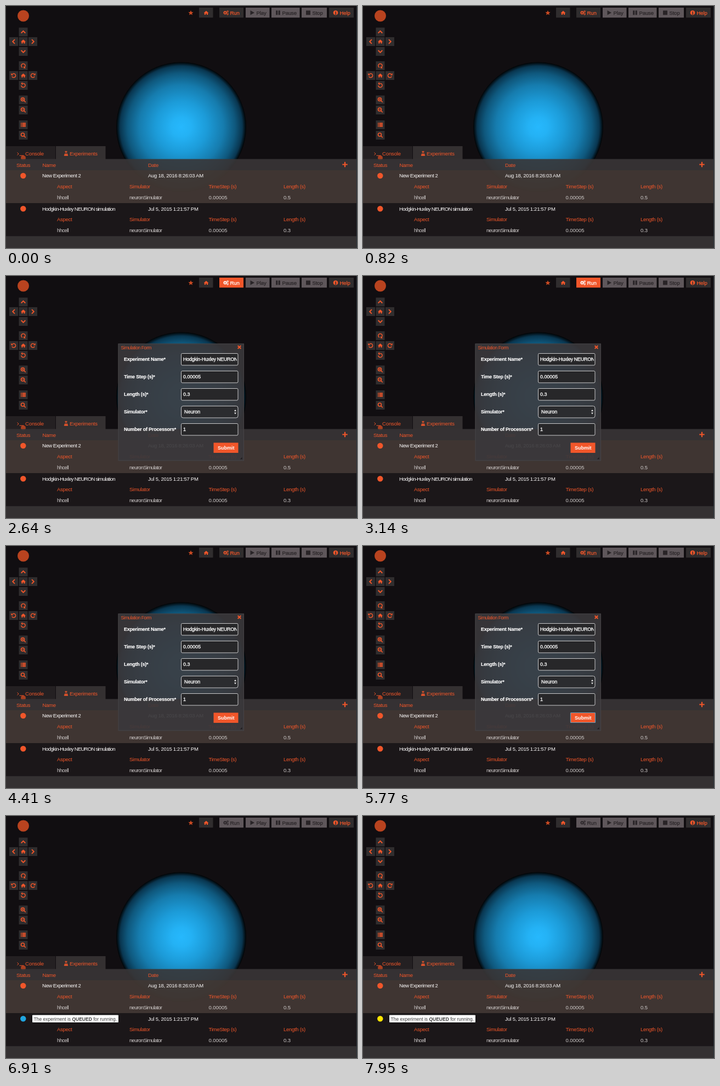
These frames come from a looping animation (640x442 px, 8 s). An HTML page:

```html
<!DOCTYPE html>
<html lang="en">
<head>
<meta charset="utf-8">
<title>Simulation experiments</title>
<style>
  html, body { margin: 0; width: 100%; height: 100%; overflow: hidden; background: #110e11; }
  svg { display: block; width: 100vw; height: 100vh; }
  text { font-family: "Liberation Sans", Arial, sans-serif; white-space: pre; }
</style>
</head>
<body>
<svg id="stage" viewBox="0 0 640 442"></svg>
<script>
const ORANGE = '#f1562a', WHITE = '#fbf9f9', BUTTON = '#302d2e', DISABLED = '#5f575b', INK = '#292427';
const LOOP = 8000;
const RUN_HOVER = 2050, FORM_OPEN = 2450, RUN_LEAVE = 3750;
const SUBMIT_FOCUS = 5350, FORM_CLOSE = 5900, QUEUED = 6300, WAITING = 7400;

const rect = (x, y, w, h, fill, extra = '') =>
  `<rect x="${x}" y="${y}" width="${w}" height="${h}" fill="${fill}" ${extra}/>`;
const circle = (x, y, r, fill, extra = '') =>
  `<circle cx="${x}" cy="${y}" r="${r}" fill="${fill}" ${extra}/>`;
// `thick` outlines the glyphs slightly, for a weight between regular and bold.
const label = (x, y, str, { size = 9.5, fill = ORANGE, gap = -.28, weight = 400, thick = 0 } = {}) =>
  `<text x="${x}" y="${y + 3.4}" font-size="${size}" fill="${fill}" stroke="${fill}" stroke-width="${thick}"
    letter-spacing="${gap}" font-weight="${weight}">${str}</text>`;
const group = (id, content) => `<g id="${id}">${content}</g>`;

// Icons are drawn around 0,0 and take their colour from the enclosing group.
const line = (d, width = 1.5) => `<path d="${d}" fill="none" stroke="currentColor" stroke-width="${width}"/>`;
const solid = d => `<path d="${d}" fill="currentColor"/>`;
const spin = (art, transform) => `<g transform="${transform}">${art}</g>`;
const turn = line('M-3.3 1.5A3.6 3.6 0 1 0-2.4-2.7') + solid('M-4.7-4.6V-.6H-.7Z');
const lens = line('M2-1A3 3 0 1 0-4-1A3 3 0 1 0 2-1M1.3 1.3L4.3 4.3', 1.6);
const chevron = angle => spin(line('M-3.8 2L0-1.8L3.8 2', 1.9), `rotate(${angle})`);
const gear = (x, y, r) =>
  circle(x, y, r, 'none', `stroke="currentColor" stroke-width="${r * .7}"`) +
  circle(x, y, r * 1.5, 'none', `stroke="currentColor" stroke-width="1" stroke-dasharray="${r * .6}"`);
const ICONS = {
  home: solid('M0-3.7L4.5 .3H3.2V3.6H.9V1.2H-.9V3.6H-3.2V.3H-4.5Z'),
  up: chevron(0), right: chevron(90), down: chevron(180), left: chevron(270),
  undo: turn,
  redo: spin(turn, 'scale(-1 1)'),
  over: spin(turn, 'rotate(90) scale(-1 1)'),
  under: spin(turn, 'rotate(25)'),
  search: lens,
  zoomIn: lens + line('M-2.7-1H.7M-1-2.7V.7', 1),
  zoomOut: lens + line('M-2.7-1H.7', 1),
  list: line('M-4.5-3H-3M-2-3H4.5M-4.5-1H-3M-2-1H4.5M-4.5 1H-3M-2 1H4.5M-4.5 3H-3M-2 3H4.5', 1.3),
  star: solid('M0-4.6L1.3-1.5L4.6-1.3L2.1.8L2.9 4L0 2.3L-2.9 4L-2.1.8L-4.6-1.3L-1.3-1.5Z'),
  gears: gear(-1.5, 0, 2) + gear(3.1, -2.4, 1.1) + gear(3.1, 2.4, 1.1),
  play: solid('M-3.5-4.3L4 0L-3.5 4.3Z'),
  pause: solid('M-3.8-4H-.7V4H-3.8ZM.7-4H3.8V4H.7Z'),
  stop: solid('M-4-4H4V4H-4Z'),
  info: circle(0, 0, 4.3, 'currentColor') +
    `<path d="M-1-.6H.4V2.5M-1.2 2.5H1.4M-.3-2.5H.8" fill="none" stroke="${BUTTON}" stroke-width="1.2"/>`,
  flask: line('M-2-4H2M-1-4V-1L-3.4 3.5H3.4L1-1V-4', 1) + solid('M-2 1H2L3.4 3.7H-3.4Z'),
  prompt: line('M-5.5-2.5L-3 0L-5.5 2.5M-1.5 3.2H6.5', 1),
  plus: line('M-4.7 0H4.7M0-4.7V4.7', 2.2),
  close: line('M-2.8-2.8L2.8 2.8M2.8-2.8L-2.8 2.8', 2),
};
const icon = (name, x, y, color = ORANGE) =>
  `<g transform="translate(${x} ${y})" color="${color}">${ICONS[name]}</g>`;

const toolButton = (name, x, y) => rect(x - 8, y - 8, 16, 16, BUTTON) + icon(name, x, y);
const barButton = (x, w, name, str, fill, ink) =>
  rect(x, 3, w, 18.2, fill) + icon(name, x + 12, 12.3, ink) +
  label(x + 19.5, 12.5, str, { fill: ink, gap: -.1, thick: .25 });

function scene() {
  return `<defs><radialGradient id="ball">
      <stop offset="0" stop-color="#26b8fd"/><stop offset=".15" stop-color="#24b2f5"/>
      <stop offset=".4" stop-color="#1c9bd8"/><stop offset=".65" stop-color="#167cae"/>
      <stop offset=".83" stop-color="#0f587d"/><stop offset=".94" stop-color="#093650"/>
      <stop offset=".975" stop-color="#041722"/><stop offset="1" stop-color="#020304"/>
    </radialGradient>
    <clipPath id="nameField">${rect(320, 142, 101, 21, '#000')}</clipPath></defs>` +
    rect(0, 0, 640, 442, '#110e11') + circle(319.5, 221, 118.5, 'url(#ball)');
}

function toolbars() {
  const tools = [
    ['up', 31.5, 47.5], ['left', 14, 65], ['home', 31.5, 65], ['right', 49, 65], ['down', 31.5, 83],
    ['over', 31.5, 109], ['undo', 14, 127], ['home', 31.5, 127], ['redo', 49, 127], ['under', 31.5, 145],
    ['zoomIn', 31.5, 171.5], ['zoomOut', 31.5, 190], ['list', 31.5, 217], ['search', 31.5, 236],
  ];
  return circle(31.5, 18, 10.5, '#b8431f') + tools.map(t => toolButton(...t)).join('') +
    icon('star', 337, 12.5, '#c94a23') + rect(352, 3, 25.5, 18.2, BUTTON) + icon('home', 365, 12.5) +
    group('runIdle', barButton(389, 44, 'gears', 'Run', BUTTON, ORANGE)) +
    group('runHover', barButton(389, 44, 'gears', 'Run', ORANGE, '#fff')) +
    group('runOff', barButton(389, 44, 'gears', 'Run', DISABLED, INK)) +
    barButton(437, 43.5, 'play', 'Play', DISABLED, INK) +
    barButton(484, 51.5, 'pause', 'Pause', DISABLED, INK) +
    barButton(539, 46, 'stop', 'Stop', DISABLED, INK) +
    barButton(589, 45, 'info', 'Help', BUTTON, ORANGE);
}

function experiment(y, id, name, nameGap, date, length) {
  const columns = [[93, 'Aspect', 'hhcell', -.65], [225, 'Simulator', 'neuronSimulator', -.7],
    [369.5, 'TimeStep (s)', '0.00005', -.05], [506, 'Length (s)', length, -.05]];
  return circle(31.3, y + 10, 5.2, ORANGE, `id="${id}"`) +
    label(66, y + 10, name, { fill: WHITE, gap: nameGap }) + label(259, y + 10, date, { fill: WHITE }) +
    columns.map(([x, head, value, gap]) => label(x, y + 29.5, head) +
      label(x, y + 49.3, value, { fill: '#d0cccb', gap })).join('');
}

function panel() {
  return rect(0, 256, 90, 24, '#242022') + rect(91, 256, 90.5, 24, '#343031') +
    circle(31.5, 277.5, 4.5, '#a83f20') + icon('prompt', 26, 270) + label(35, 270, 'Console', { gap: -.12 }) +
    icon('flask', 109.5, 269.5) + label(116, 269.5, 'Experiments', { gap: -.18 }) +
    rect(0, 279.5, 640, 21, '#393637', 'opacity=".9"') +
    rect(0, 300, 640, 60.3, '#413733', 'opacity=".97"') +
    rect(0, 360.3, 640, 60, '#1b1719') + rect(0, 420.3, 640, 22, '#343132') +
    label(19, 290.5, 'Status') + label(66.5, 290.5, 'Name') + label(259, 290.5, 'Date') + icon('plus', 618, 289.5) +
    experiment(300, 'firstDot', 'New Experiment 2', -.45, 'Aug 18, 2016 8:26:03 AM', '0.5') +
    experiment(360.3, 'secondDot', 'Hodgkin-Huxley NEURON simulation', -.73, 'Jul 5, 2015 1:21:57 PM', '0.3') +
    rect(639, 0, 1, 442, '#28323a');
}

function form() {
  const fields = [['Experiment Name*', 'Hodgkin-Huxley NEURON simulation'], ['Time Step (s)*', '0.00005'],
    ['Length (s)*', '0.3'], ['Simulator*', 'Neuron'], ['Number of Processors*', '1']];
  const rows = fields.map(([title, value], i) => {
    const y = 152.3 + i * 32, select = i === 3;
    return label(215, y - .3, title, { size: 9, fill: '#fff', gap: -.24, weight: 700, thick: .15 }) +
      rect(319.5, y - 10.8, 103.5, 21.5, select ? '#2b2c2f' : '#272729', `rx="${select ? 3.5 : 2}" stroke="#c9c9ca"`) +
      `<g ${i ? '' : 'clip-path="url(#nameField)"'}>` +
      label(select ? 325 : 323, y - .5, value, { size: 9, fill: '#fff', gap: i ? -.05 : -.28, thick: .3 }) + '</g>';
  }).join('');
  return rect(204.5, 123.5, 229.5, 214, '#3a383b', 'opacity=".92"') +
    rect(205, 124, 228.5, 213, 'none', 'stroke="#474446"') +
    label(209.5, 130.5, 'Simulation Form', { size: 8.5, gap: -.43 }) + icon('close', 425.5, 130) + rows +
    '<path d="M416 247L418 244L420 247ZM416 249.5L418 252.5L420 249.5Z" fill="#eee"/>' +
    '<path d="M427 334.5H430.5V331Z" fill="#1c1a1c"/>' +
    rect(378.5, 304.5, 45, 18.5, ORANGE) +
    group('focusRing', rect(378.5, 304.5, 45, 18, 'none', 'rx="1" stroke="#5f9dbd" stroke-width="1.2"')) +
    label(386, 313.8, 'Submit', { size: 9, fill: '#fff', gap: 0, weight: 700 });
}

const tooltip = () => rect(47.5, 363, 158, 14.5, '#fff', 'rx="1.5" stroke="#111"') +
  label(50.5, 370.8, 'The experiment is <tspan font-weight="700">QUEUED</tspan> for running.',
    { size: 8.5, fill: '#3d3d3d', gap: 0 });

const stage = document.getElementById('stage');
stage.innerHTML = scene() + toolbars() + panel() + group('tooltip', tooltip()) + group('form', form());

const show = (id, visible) =>
  document.getElementById(id).setAttribute('display', visible ? 'inline' : 'none');
const between = (t, from, to) => t >= from && t < to;

function render(t) {
  const hover = between(t, RUN_HOVER, RUN_LEAVE), queued = t >= QUEUED;
  show('runIdle', !hover && !queued);
  show('runHover', hover);
  show('runOff', queued);
  show('form', between(t, FORM_OPEN, FORM_CLOSE));
  show('focusRing', t >= SUBMIT_FOCUS);
  show('tooltip', queued);
  document.getElementById('secondDot').setAttribute('fill',
    t >= WAITING ? '#ffe500' : queued ? '#20a5df' : ORANGE);
}

const start = performance.now();
function tick() {
  render((performance.now() - start) % LOOP);
  requestAnimationFrame(tick);
}
tick();
</script>
</body>
</html>
```
